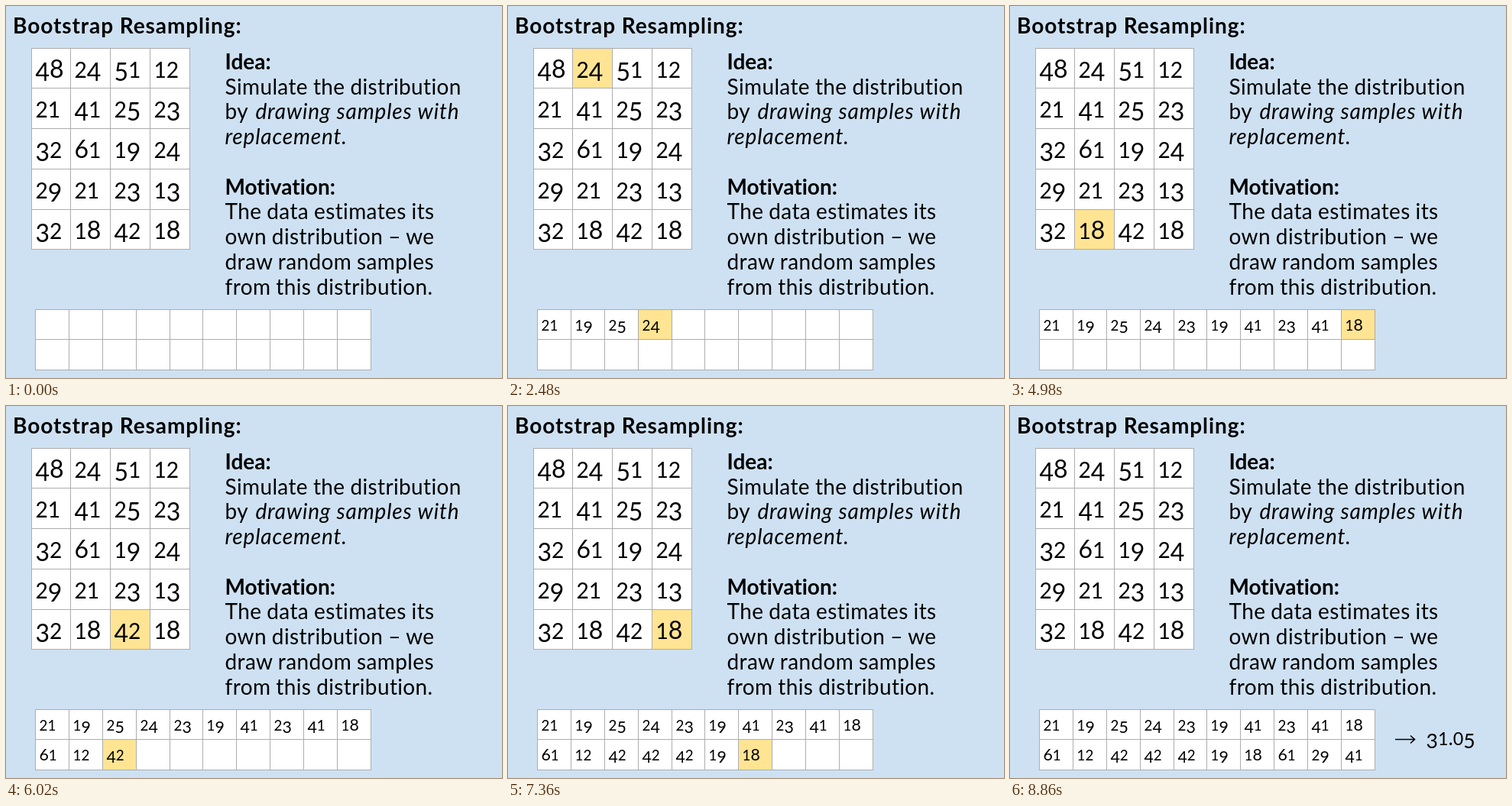
Animation, 649 px wide and 487 px high, one loop 9.91 s. Source, as an HTML page:

```html
<!DOCTYPE html>
<html lang="en">
<head>
<meta charset="utf-8">
<title>Bootstrap Resampling</title>
<style>
  html, body { margin: 0; width: 100%; height: 100%; overflow: hidden; background: #cee1f2; }
  svg { display: block; width: 649px; height: 487px; }
  text { font-family: Lato, "Open Sans", sans-serif; font-size: 28px; white-space: pre; font-variant-ligatures: none; }
  .title { font-weight: 700; letter-spacing: .033em; }
  .label { font-weight: 700; }
  .body { letter-spacing: .013em; word-spacing: -.02em; }
  .slanted { font-style: italic; letter-spacing: .029em; }
  .cell { fill: #fff; stroke: #adadad; stroke-width: 1; shape-rendering: crispEdges; }
  .lit { fill: #ffe493; }
</style>
</head>
<body>
<svg id="stage" viewBox="0 0 649 487"></svg>
<script>
const LOOP = 9910;
const LONG = 445;
const SHORT = 300;

const population = '48 24 51 12 21 41 25 23 32 61 19 24 29 21 23 13 32 18 42 18'.split(' ');
const resample = '21 19 25 24 23 19 41 23 41 18 61 12 42 42 42 19 18 61 29 41'.split(' ');

// Draws alternate long and short holds; the rhythm restarts at these draws.
const restarts = { 0: 1340, 1: 1730, 4: 3040, 15: 7060, 16: 7360 };
const starts = [];
for (let i = 0, long = true; i <= resample.length; i++) {
  if (i in restarts) {
    starts.push(restarts[i]);
    long = true;
  } else {
    starts.push(starts[i - 1] + (long ? LONG : SHORT));
    long = !long;
  }
}
const resultAt = starts[resample.length];

// A value held by two cells is taken from each in turn.
const pickedCells = resample.map((value, i) =>
  Math.floor(i * 0.32) % 2 ? population.lastIndexOf(value) : population.indexOf(value));

const stage = document.getElementById('stage');

function add(parent, tag, attrs, content = '') {
  const node = document.createElementNS('http://www.w3.org/2000/svg', tag);
  for (const key in attrs) node.setAttribute(key, attrs[key]);
  node.textContent = content;
  parent.append(node);
  return node;
}

function label(x, y, style, content) {
  return add(stage, 'text', { x, y, class: style }, content);
}

// Old-style figures: 0, 1, 2 are shorter; 3, 4, 5, 7, 9 hang below the line.
function figures(parent, x, y, size, value) {
  const text = add(parent, 'text', { x, y, style: `font-size:${size}px` });
  let drop = 0;
  for (const digit of value) {
    const scale = '012'.includes(digit) ? 0.88 : 1;
    const next = '34579'.includes(digit) ? size * 0.14 : 0;
    add(text, 'tspan', { dy: next - drop, style: `font-size:${size * scale}px` }, digit);
    drop = next;
  }
  return text;
}

function makeGrid(x, y, width, height, columns, rows) {
  const edge = (start, length, fraction) => Math.floor(start + length * fraction) + 0.5;
  return Array.from({ length: columns * rows }, (_, i) => {
    const col = i % columns;
    const row = Math.floor(i / columns);
    const left = edge(x, width, col / columns);
    const top = edge(y, height, row / rows);
    const node = add(stage, 'rect', {
      x: left, y: top, class: 'cell',
      width: edge(x, width, (col + 1) / columns) - left,
      height: edge(y, height, (row + 1) / rows) - top
    });
    return { node, left, top };
  });
}

label(9, 36, 'title', 'Bootstrap Resampling:');

const leading = 32.75;
const firstLine = 82.8;
[
  ['label', 'Idea:'],
  ['body', 'Simulate the distribution'],
  ['body', 'by'],
  ['slanted', 'replacement.'],
  null,
  ['label', 'Motivation:'],
  ['body', 'The data estimates its'],
  ['body', 'own distribution – we'],
  ['body', 'draw random samples'],
  ['body', 'from this distribution.']
].forEach((line, i) => line && label(286.5, firstLine + i * leading, ...line));
label(326.5, firstLine + 2 * leading, 'slanted', 'drawing samples with');

const source = makeGrid(33, 55, 207, 263.8, 4, 5);
const sample = makeGrid(38.9, 397, 438.1, 79, 10, 2);

source.forEach(({ left, top }, i) =>
  figures(stage, left + 5, top + 38, 32, population[i]));
const drawn = sample.map(({ left, top }, i) =>
  figures(stage, left + 5, top + 27.5, 21.3, resample[i]));

const result = add(stage, 'g', {});
add(result, 'path', {
  d: 'M504 436.5H529M524 431.5L529.5 436.5L524 441.5',
  fill: 'none', stroke: '#000', 'stroke-width': 1.6
});
figures(result, 544.5, 444, 26.5, '31.05');

function render(time) {
  const count = starts.filter(start => start <= time).length;
  const active = time < resultAt ? count - 1 : -1;
  const picked = pickedCells[active];
  source.forEach(({ node }, i) => node.classList.toggle('lit', i === picked));
  sample.forEach(({ node }, i) => node.classList.toggle('lit', i === active));
  drawn.forEach((node, i) => node.setAttribute('visibility', i < count ? 'visible' : 'hidden'));
  result.setAttribute('visibility', time >= resultAt ? 'visible' : 'hidden');
}

const began = performance.now();
function tick() {
  render((performance.now() - began) % LOOP);
  requestAnimationFrame(tick);
}
tick();
</script>
</body>
</html>
```
